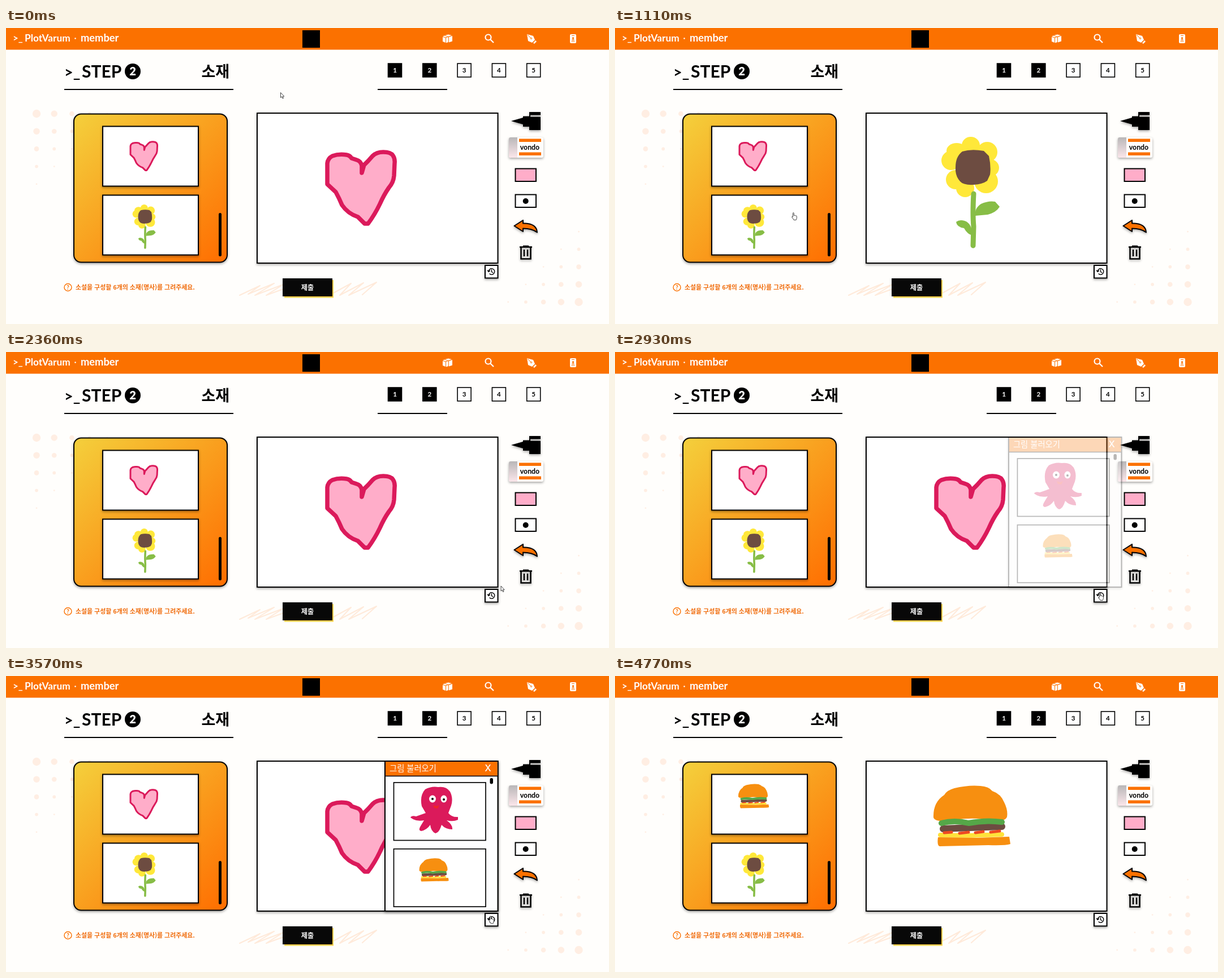
An HTML page for the animation above (5120 ms loop, 1066 px wide and 525 px high).

```html
<!DOCTYPE html>
<html lang="ko">
<head>
<meta charset="utf-8">
<title>Story editor</title>
<style>
  html, body { margin: 0; width: 100%; height: 100%; overflow: hidden; background: #fffefc; }
  svg { display: block; width: 1066px; height: 525px; }
  text { font-family: Lato, "Open Sans", sans-serif; font-weight: 700; }
  .ko { font-family: "Noto Sans CJK KR", "Noto Sans CJK", "Noto Sans CJK JP", sans-serif; }
  .mid { text-anchor: middle; }
  .box { fill: #fff; stroke: #000; stroke-width: 2; }
  .shade { filter: drop-shadow(0 2px 2px rgba(0, 0, 0, .35)); }
  .ink { fill: none; stroke-linecap: round; stroke-linejoin: round; }
</style>
</head>
<body>
<svg viewBox="0 0 1066 525" xmlns="http://www.w3.org/2000/svg">
  <defs>
    <linearGradient id="gold" gradientUnits="userSpaceOnUse" x1="122" y1="150" x2="389" y2="417">
      <stop offset="0" stop-color="#f4d03c"/><stop offset="1" stop-color="#ff6d00"/>
    </linearGradient>
    <linearGradient id="rubber" x1="0" y1="0" x2="0" y2="1">
      <stop offset="0" stop-color="#b9b7b8"/><stop offset="1" stop-color="#fbe6ea"/>
    </linearGradient>

    <path id="heart" fill="#ffadc9" stroke="#db1a5b" stroke-width="7.5" stroke-linejoin="round"
      d="M568 277V240Q569 231 577 227Q588 223 602 225Q608 226 611 231L620 234Q627 236 629 244V257L633 243L640 236L648 227Q655 220 667 220Q680 220 684 226Q688 232 687 240L686 262Q685 274 677 283Q668 296 661 312Q652 331 640 347L634 347L622 335Q604 329 594 314Q589 302 583 291Z"/>

    <g id="flower">
      <g fill="#ffe83a">
        <circle cx="594" cy="235" r="17"/><ellipse cx="604" cy="218" rx="18" ry="14"/>
        <ellipse cx="629" cy="208" rx="16" ry="15"/><circle cx="658" cy="220" r="18"/>
        <circle cx="664" cy="248" r="15"/><circle cx="656" cy="272" r="21"/>
        <circle cx="619" cy="284" r="16"/><circle cx="602" cy="269" r="17"/>
      </g>
      <path fill="#6d4c41" d="M614 219Q630 214 652 218L661 227Q665 245 663 260L658 271Q650 277 634 278Q616 279 610 272Q601 262 602 247Q602 228 614 219Z"/>
      <path class="ink" stroke="#87bd46" stroke-width="9" d="M634 294Q632 330 634 352L633 386"/>
      <path fill="#87bd46" d="M637 333Q635 320 647 312Q660 306 672 308L680 317Q674 327 659 331ZM603 344Q609 339 618 342Q631 346 632 368Q623 366 617 355Q604 353 603 344Z"/>
    </g>

    <g id="burger">
      <path fill="#f78f10" d="M563 251Q562 224 582 211Q586 203 600 199Q625 193 646 195Q661 196 667 204Q682 209 688 224Q695 238 693 250Q690 257 678 256Q630 250 603 255Q566 261 563 251Z"/>
      <g class="ink">
        <path stroke="#ffe23a" stroke-width="8" d="M575 282Q620 284 684 281"/>
        <path stroke="#6d4c41" stroke-width="12" d="M580 271L628 269L684 267"/>
        <path stroke="#55a748" stroke-width="10" d="M577 261Q600 255 625 261Q655 255 684 259"/>
        <path stroke="#ee4a22" stroke-width="5" d="M582 278L595 277M609 279L625 277M637 278L651 276M664 277L680 275"/>
      </g>
      <path fill="#f78f10" d="M571 286L640 287L697 285L699 298Q690 301 660 300L574 302Q569 301 571 286Z"/>
    </g>

    <g id="octopus">
      <path fill="#db1a5b" d="M741 201Q752 195 764 197Q778 195 785 205Q791 217 787 230L782 243Q788 251 799 250V255Q790 259 779 256Q790 264 789 272Q777 272 770 264Q766 278 759 279Q751 275 750 264Q744 273 734 275Q728 274 733 266L739 256Q725 259 715 251Q717 247 725 249L742 243L735 231Q731 212 741 201Z"/>
      <g fill="#fff"><ellipse cx="754" cy="218" rx="6" ry="6.5"/><ellipse cx="774" cy="218" rx="5.5" ry="6.5"/></g>
      <circle cx="754" cy="218" r="2"/><circle cx="774" cy="219" r="2"/>
      <path fill="#f02626" d="M755 229L761 231L766 229L763 235L757 234Z"/>
    </g>
  </defs>

  <rect width="1066" height="525" fill="#fffefc"/>
  <g id="dots" fill="#ffeee3"></g>

  <!-- top bar -->
  <rect width="1066" height="38.5" fill="#fb7100"/>
  <g fill="#fff">
    <text x="12" y="23.500" font-size="17">&gt;_</text>
    <text x="33" y="23.500" font-size="17.300">PlotVarum</text>
    <circle cx="122.500" cy="18.500" r="1.300"/>
    <text x="132" y="23.500" font-size="18.300">member</text>
    <path d="M776 13L782 11.500L788 13L782 15ZM772 16L777 17.500V26L772 24ZM778 17.500L782 16V25L778 26.500ZM783 16L789 14V23.500L783 25.500ZM772 15L775 13.500L781 15.500L777 16.500Z"/>
    <path d="M921 11L932 14L935 21L930 26L923 23ZM932 26.500L936 22L938 24L934 28Z"/>
    <path d="M999 11H1006Q1008 11 1008 13V25Q1008 27 1006 27H999Q997 27 997 25V13Q997 11 999 11Z"/>
  </g>
  <g fill="none" stroke="#fff" stroke-width="2.200"><circle cx="852.500" cy="16.500" r="5"/><path d="M856 20L862 26"/></g>
  <g stroke="#fb7100" fill="none"><path d="M922 12L928 18"/><circle cx="928.500" cy="18.500" r="1.200"/><path d="M1000 13.500H1005M999.500 24H1005.500"/></g>
  <circle cx="1002.500" cy="18" r="1.800" fill="#fb7100"/><path d="M999.500 22Q1002.500 18.500 1005.500 22Z" fill="#fb7100"/>
  <rect x="524" y="4" width="31" height="31"/>

  <!-- headings -->
  <text x="103" y="87.500" font-size="27">&gt;_</text>
  <text x="134" y="87.500" font-size="30">STEP</text>
  <circle cx="224" cy="77" r="14"/>
  <text class="mid" x="224" y="84" font-size="20" fill="#fff" style="font-weight:900">2</text>
  <text class="ko" x="345.500" y="87" font-size="27">소재</text>
  <path d="M103 109H402M657 109H780" stroke="#000" stroke-width="2"/>
  <g id="steps"></g>

  <!-- picture list -->
  <rect class="shade" x="120" y="152.500" width="271" height="263" rx="13" fill="url(#gold)" stroke="#000" stroke-width="2"/>
  <g class="box"><rect class="shade" x="171" y="174.500" width="169" height="106"/><rect class="shade" x="171" y="296.500" width="169" height="106"/></g>
  <rect x="376" y="328" width="5" height="77" rx="2.500"/>
  <g transform="translate(170.500 174) scale(.399) translate(-444 -150.500)"><use id="thumb"/></g>
  <use href="#flower" transform="translate(170.500 296) scale(.399) translate(-444 -150.500)"/>

  <!-- canvas -->
  <rect class="box shade" x="444" y="151" width="425.500" height="266"/>
  <use id="art"/>

  <!-- footer -->
  <g fill="none" stroke="#fb7100" stroke-width="1.400"><circle cx="109.500" cy="460" r="6.500"/></g>
  <text class="mid" x="109.500" y="464" font-size="10.500" fill="#fb7100">?</text>
  <text class="ko" x="123" y="464" font-size="10.900" fill="#f06a08">소설을 구성할 6개의 소재(명사)를 그려주세요.</text>
  <path class="ink" stroke="#ffeada" stroke-width="2" d="M413 474L449 457L428 472L474 453L440 474L490 455L460 474L490 463M577 471L610 453L590 474L632 452L606 474L655 451L630 473"/>
  <rect x="492" y="447" width="87" height="31.500" fill="#ffd34d"/>
  <rect x="489" y="444" width="88" height="32" fill="#080808"/>
  <text class="ko mid" x="533" y="464.500" font-size="12.200" fill="#fff">제출</text>

  <!-- tools -->
  <g class="shade">
    <path d="M893 165L914 159V156.500H925V149H945V154.500H927V157.500H945V181H925V175H914V171Z"/>
  </g>
  <g class="shade">
    <rect x="889" y="194" width="61" height="36" rx="3" fill="#fffdfb"/>
    <path d="M904 194H892Q889 194 889 197V227Q889 230 892 230H904Z" fill="url(#rubber)"/>
  </g>
  <path d="M907 196.500H946V202H907ZM907 220.500H946V226H907Z" fill="#fb7100"/>
  <text class="mid" x="926" y="215.500" font-size="12.300">vondo</text>
  <rect class="box" x="900.500" y="249.500" width="36.500" height="22.500" style="fill:#ffadc9"/>
  <rect class="box" x="900.500" y="295.500" width="36.500" height="22.500"/>
  <circle cx="918.700" cy="307" r="5"/>
  <path class="shade" d="M898.500 351L914 341V346.500Q938 346 939 362.500Q930 355.500 914 355.500V361Z" fill="#fb7100" stroke="#000" stroke-width="2" stroke-linejoin="round"/>
  <g class="shade" fill="none" stroke="#000" stroke-width="2.500"><path d="M908 388.500H930M914 387H924M910.500 389V409.500H927.500V389M916 393V405M922 393V405"/></g>
  <rect class="box shade" x="847" y="421" width="22.500" height="22.500"/>
  <path class="ink" stroke="#000" stroke-width="1.400" d="M853.200 432A5.300 5.300 0 1 1 855 436M851.500 430L853.200 432.500L855.500 430.500M858.500 429V432.500L861 434"/>

  <!-- slide-in panel -->
  <g id="panel">
    <rect class="box shade" x="670" y="151" width="199.500" height="266" style="fill:#fdfdfe"/>
    <path d="M671 152H868.500V177H671Z" fill="#fb7100"/>
    <path d="M670 177.500H869" stroke="#000" stroke-width="1.500"/>
    <text class="ko" x="678" y="169" font-size="14.300" fill="#fff" style="font-weight:500">그림 불러오기</text>
    <text class="mid" x="852" y="169" font-size="16.500" fill="#fff" style="font-family:Inter,sans-serif;font-weight:500">X</text>
    <g class="box" style="stroke-width:1.700"><rect x="685.500" y="189" width="162.500" height="102.500"/><rect x="685.500" y="306.700" width="162.500" height="102.500"/></g>
    <rect x="855.500" y="181" width="5.500" height="10.500" rx="2.700"/>
    <use href="#octopus"/>
    <use href="#burger" transform="translate(685 306.500) scale(.383) translate(-444 -150.500)"/>
  </g>

  <g id="cursor" fill="#fff" stroke="#333" stroke-width=".9" stroke-linejoin="round">
    <path id="arrow" d="M.5 .5V9.500L2.600 7.700L4 11L5.500 10.400L4.100 7.200H6.700Z"/>
    <path id="hand" d="M2.500 8V1.500Q2.500 .5 3.400 .5T4.300 1.500V5.500Q5 4.700 5.900 5.600Q6.800 5 7.500 6Q9.300 5.600 9.300 7.300V10Q9 11.500 8.200 13.500H4Q3 11 1 9Q.3 8 1 7.400Q1.700 7.100 2.500 8Z"/>
  </g>
</svg>
<script>
  const LOOP = 5120;
  const $ = id => document.getElementById(id);

  // [ms, x, y] of the pointer's upper left corner
  const path = [
    [0, 485, 114], [50, 484, 115], [560, 398, 218], [960, 312, 327], [1160, 312, 327],
    [1510, 297, 227], [1660, 300, 225], [1860, 300, 225], [2210, 874, 410], [2310, 877, 413],
    [2560, 854, 427], [3520, 854, 427], [4070, 815, 361], [4170, 817, 358], [4320, 817, 358],
    [4620, 975, 9], [4770, 996, -14], [LOOP, 996, -14]
  ];
  const artSteps = [[0, 'heart'], [960, ''], [1060, 'flower'], [1710, ''], [1860, 'heart'], [4220, ''], [4320, 'burger']];
  const thumbSteps = [[0, 'heart'], [4320, 'burger']];
  const panelIn = 2815, panelTime = 600, panelOut = 4220;

  const at = (steps, t) => steps.filter(s => s[0] <= t).pop()[1];
  const smooth = p => p * p * (3 - 2 * p);

  // cubic-bezier(.25, .1, .25, 1)
  function ease(p) {
    if (p <= 0 || p >= 1) return Math.min(1, Math.max(0, p));
    let lo = 0, hi = 1, u;
    for (let i = 0; i < 20; i++) {
      u = (lo + hi) / 2;
      const x = .75 * u * (1 - u) + u * u * u;
      if (x < p) lo = u; else hi = u;
    }
    return .3 * u * (1 - u) * (1 - u) + 3 * u * u * (1 - u) + u * u * u;
  }

  function build() {
    let dots = '', steps = '';
    for (let i = 0; i < 5; i++) {
      for (let j = 0; i + j < 5; j++) {
        const r = 7.2 - 1.45 * (i + j), dx = 31.2 * i, dy = 31.2 * j;
        dots += `<circle cx="${54 + dx}" cy="${152 + dy}" r="${r}"/><circle cx="${1012.5 - dx}" cy="${486 - dy}" r="${r}"/>`;
      }
      const x = 687.5 + 61.3 * i, done = i < 2;
      steps += `<rect x="${x - 12}" y="63" width="24" height="24" fill="${done ? '#000' : '#fff'}" stroke="#000" stroke-width="1.6"/>
        <text class="mid" x="${x}" y="79" font-size="11.5" fill="${done ? '#fff' : '#000'}">${i + 1}</text>`;
    }
    $('dots').innerHTML = dots;
    $('steps').innerHTML = steps;
  }

  function show(id, name) {
    const el = $(id), ref = '#' + name;
    el.style.display = name ? '' : 'none';
    if (name && el.getAttribute('href') !== ref) el.setAttribute('href', ref);
  }

  function pointer(t) {
    const k = path.findIndex(p => p[0] > t);
    const [t0, x0, y0] = path[k - 1], [t1, x1, y1] = path[k];
    const p = smooth((t - t0) / (t1 - t0));
    const x = x0 + (x1 - x0) * p, y = y0 + (y1 - y0) * p;
    const inside = (l, top, r, b) => x + 3 > l && x + 3 < r && y > top && y < b;
    const hand = inside(170, 174, 340, 281) || inside(170, 296, 340, 403) || inside(846, 420, 870, 444);
    $('cursor').setAttribute('transform', `translate(${x} ${y})`);
    $('hand').style.display = hand ? '' : 'none';
    $('arrow').style.display = hand ? 'none' : '';
  }

  function draw(t) {
    show('art', at(artSteps, t));
    show('thumb', at(thumbSteps, t));
    const open = t < panelOut ? ease((t - panelIn) / panelTime) : 0;
    $('panel').setAttribute('opacity', open);
    $('panel').setAttribute('transform', `translate(${36 * (1 - open)} 0)`);
    pointer(t);
  }

  build();
  const start = performance.now();
  function tick() {
    draw((performance.now() - start) % LOOP);
    requestAnimationFrame(tick);
  }
  tick();
</script>
</body>
</html>
```
